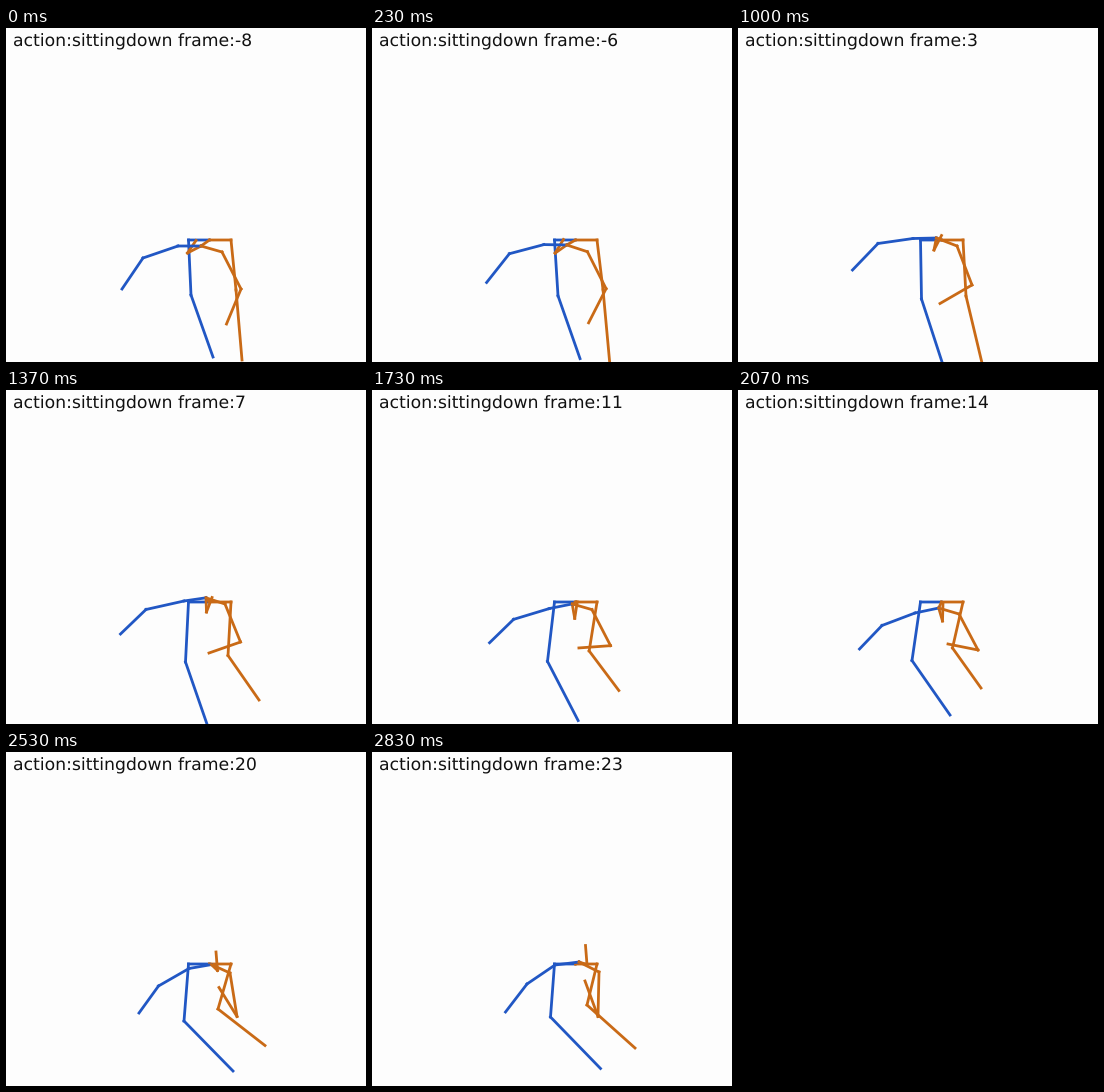
These frames come from a looping animation (360 px wide and 334 px high, 2860 ms). A matplotlib script:

```python
import numpy as np
import matplotlib.pyplot as plt
from matplotlib.animation import FuncAnimation

W, H, DPI = 360, 334, 100
LOOP, TICK = 2860, 10  # ms
BLUE, ORANGE = "#2157c4", "#c96a16"

# Pose indices at which the joints below are given; poses between are eased.
KEYS = np.array([0, 5, 11, 15, 22, 28, 31])

LEGS = {
    "l_knee": [(185, 267), (187, 269), (183.5, 271), (179.5, 272), (174, 270.5), (178, 269), (178.5, 265)],
    "l_foot": [(207, 329), (209, 333), (205, 337), (202, 337), (212, 325), (227, 319), (228.5, 316.5)],
    "r_knee": [(230, 262), (232, 262), (228, 268), (222, 265.5), (214.5, 258), (212, 257), (215, 253)],
    "r_foot": [(236, 332), (240, 336), (244, 335), (253, 310), (243, 298), (259, 293.5), (263, 296)],
}
ARMS = {
    "l_shoulder": [(172, 218), (172, 214.5), (175, 210.5), (178, 211), (177, 223), (183, 216.5), (183, 213)],
    "l_elbow": [(137, 230), (138, 220), (140, 215.5), (140, 219.5), (144, 235.5), (152.5, 234), (155, 232)],
    "l_wrist": [(116, 261), (113, 246), (114.5, 242), (114.5, 244), (121.5, 259), (133, 261), (133.5, 260)],
    "r_shoulder": [(216, 224), (215, 223), (219, 218), (219, 214), (221, 224), (224, 221), (227, 220)],
    "r_elbow": [(235, 261), (233, 260), (234, 257), (234.5, 252), (240, 260), (231, 264.5), (226, 264.5)],
    "r_wrist": [(220.5, 296), (211, 292), (202, 275.5), (203, 263), (210, 254), (213, 235.5), (213, 229)],
}
HEAD = {
    "nose": [(181.5, 225), (186, 225), (196, 222), (200.5, 222), (204.5, 231), (211.5, 218.5), (215, 212.5)],
    "crown": [(190, 212.5), (194, 210), (203.5, 207.5), (206, 207.5), (205, 213), (210, 200), (213.5, 193.5)],
}
PELVIS = {"hip": (203.5, 212), "l_hip": (182.5, 212), "r_hip": (225, 212)}

# Back to front.
BONES = [
    ("hip", "l_hip", BLUE), ("l_hip", "l_knee", BLUE), ("l_knee", "l_foot", BLUE),
    ("hip", "r_hip", ORANGE), ("r_hip", "r_knee", ORANGE), ("r_knee", "r_foot", ORANGE),
    ("hip", "neck", ORANGE), ("neck", "nose", ORANGE), ("nose", "crown", ORANGE),
    ("neck", "l_shoulder", BLUE), ("l_shoulder", "l_elbow", BLUE), ("l_elbow", "l_wrist", BLUE),
    ("neck", "r_shoulder", ORANGE), ("r_shoulder", "r_elbow", ORANGE), ("r_elbow", "r_wrist", ORANGE),
]


def spline(points, k):
    """Cubic Hermite curve through the key points, at pose k."""
    p = np.array(points, float)
    m = np.gradient(p, KEYS, axis=0)
    i = min(np.searchsorted(KEYS, k, side="right") - 1, len(KEYS) - 2)
    d = KEYS[i + 1] - KEYS[i]
    s = (k - KEYS[i]) / d
    ease = s * s * (3 - 2 * s)
    return (p[i] * (1 - ease) + p[i + 1] * ease
            + d * s * (1 - s) * (m[i] * (1 - s) - m[i + 1] * s))


def pose(k):
    joints = {name: spline(pts, k) for name, pts in {**LEGS, **ARMS, **HEAD}.items()}
    joints.update(PELVIS)
    middle = (joints["l_shoulder"] + joints["r_shoulder"]) / 2
    joints["neck"] = middle + (1 + k / 31, -3 - 3.5 * k / 31)
    return joints


def pose_index(t):
    """Poses last 90 ms each, sampled at 30 pictures per second."""
    n = (t + 5) * 3 // 100
    return n * 10 // 27


POSES = [pose(k) for k in range(KEYS[-1] + 1)]

plt.rcParams["font.family"] = "DejaVu Sans"
plt.rcParams["text.hinting"] = "none"
fig = plt.figure(figsize=(W / DPI, H / DPI), dpi=DPI, facecolor="#fdfdfd")
ax = fig.add_axes([0, 0, 1, 1])
ax.set(xlim=(0, W), ylim=(H, 0))
ax.axis("off")

title = ax.text(6.7, 18, "", fontsize=17.2 * 72 / DPI, color="#111111", va="baseline")
lines = [ax.plot([], [], color=color, lw=2, snap=False)[0] for _, _, color in BONES]


def draw(i):
    k = pose_index(i * TICK)
    joints = POSES[k]
    for line, (a, b, _) in zip(lines, BONES):
        line.set_data(*zip(joints[a], joints[b]))
    title.set_text(f"action:sittingdown frame:{k - 8}")
    return [*lines, title]


anim = FuncAnimation(fig, draw, frames=LOOP // TICK, interval=TICK,
                     repeat=True, repeat_delay=0, blit=False)
plt.show()
```
